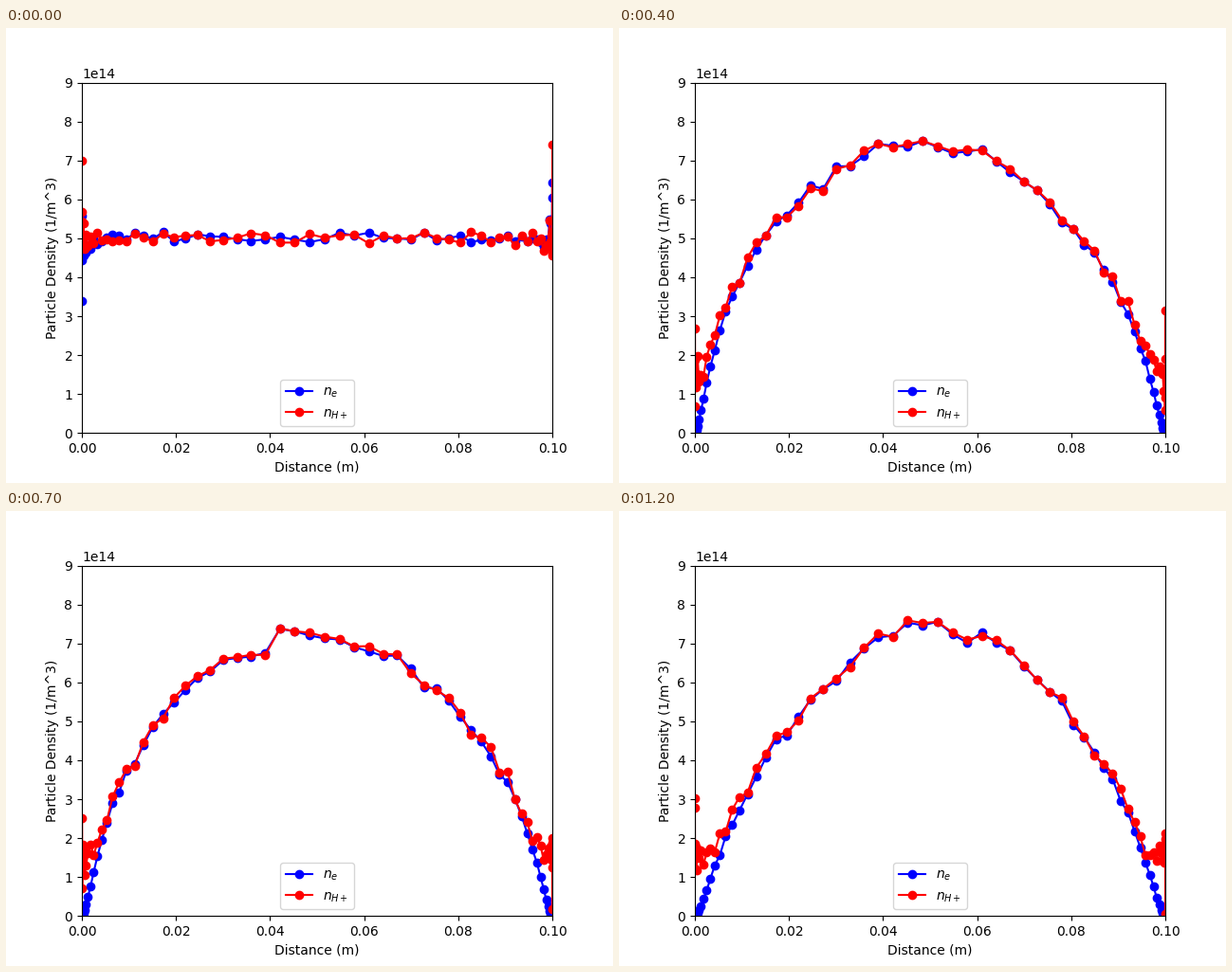
Write a matplotlib script that moves like this. It is 640 by 480 pixels and loops after 1.3 s.

```python
import numpy as np
import matplotlib.pyplot as plt
from matplotlib.animation import FuncAnimation

FRAMES, INTERVAL = 13, 100
NODES, LENGTH, SCALE = 64, 0.1, 1e14
START = 5.0    # uniform initial density
FLOOR = 1.5    # ion density left in the sheaths
SHEATH = 0.024  # sheath width, relative to the gap

# Grid refined towards both walls
u = np.linspace(0, 1, NODES)
pos = u - np.sin(2 * np.pi * u) / (2 * np.pi)
cell = np.gradient(pos)
sigma = 0.07 * np.sqrt(cell.max() / cell)  # small cells hold few particles

# Slow drift of the profile: peak height, peak position, steepness
STEPS = [2, 4, 5, 7, 9, 12]
PEAK = [8.4, 7.4, 7.5, 7.25, 7.0, 7.45]
CENTRE = [0.505, 0.475, 0.505, 0.485, 0.49, 0.51]
POWER = [0.75, 0.58, 0.72, 0.6, 0.56, 0.75]


def bulk(step):
    """Arch between the walls, drained inside the two sheaths."""
    peak, centre, power = (np.interp(step, STEPS, p) for p in (PEAK, CENTRE, POWER))
    skewed = pos ** (np.log(0.5) / np.log(centre))
    arch = np.clip(np.sin(np.pi * skewed), 0, 1) ** power
    gap = np.minimum(pos, 1 - pos)
    return peak * arch * (1 - np.exp(-gap / SHEATH))


def densities(step):
    rng = np.random.default_rng(step + 40)
    shared, own_e, own_i = np.clip(rng.standard_normal((3, NODES)), -2, 2)
    if step == 0:
        spread = np.minimum(sigma, 1.2)
        return START + spread * own_e, START + spread * own_i
    ne = bulk(step) * (1 + 0.02 * shared + 0.004 * own_e)
    ni = np.cbrt(ne ** 3 + FLOOR ** 3) + sigma * own_i
    return ne, np.abs(ni)


fig, ax = plt.subplots(figsize=(6.4, 4.8), dpi=100)
lines = [ax.plot(pos * LENGTH, n * SCALE, style, label=label)[0]
         for n, style, label in zip(densities(0), ("bo-", "ro-"),
                                    ("$n_e$", "$n_{H+}$"))]
ax.set_xlim(0, LENGTH)
ax.set_ylim(0, 9 * SCALE)
ax.set_xlabel("Distance (m)")
ax.set_ylabel("Particle Density (1/m^3)")
ax.legend(loc="lower center")


def update(step):
    for line, n in zip(lines, densities(step)):
        line.set_ydata(n * SCALE)
    return lines


anim = FuncAnimation(fig, update, frames=FRAMES, interval=INTERVAL,
                     repeat=True, repeat_delay=0)
plt.show()
```
